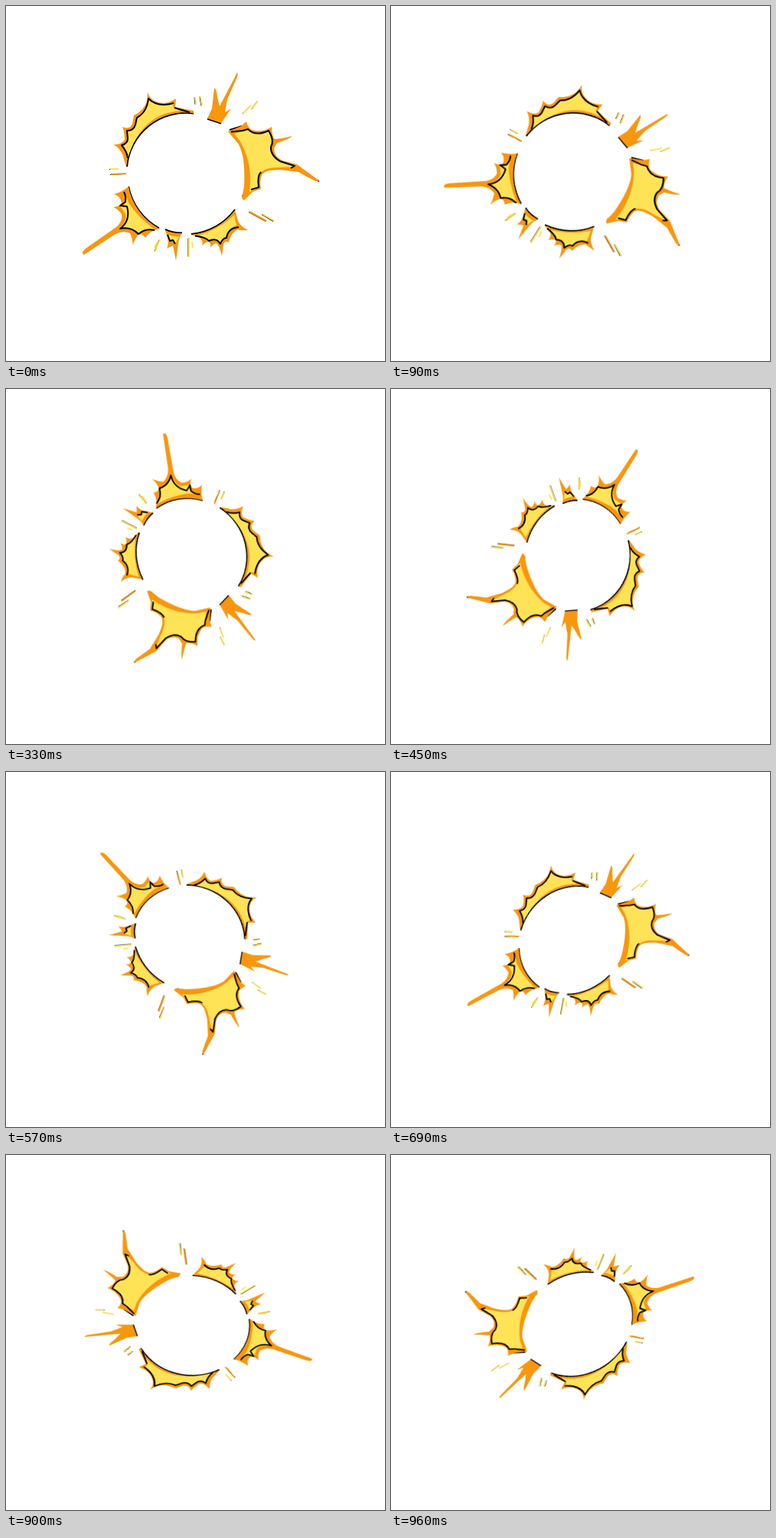
These frames come from a looping animation (495 px wide and 464 px high, 990 ms). An HTML page:

```html
<!DOCTYPE html>
<html lang="en">
<head>
<meta charset="utf-8">
<title>Spinning burst</title>
<style>
  html, body { margin: 0; width: 100%; height: 100%; overflow: hidden; background: #fff; }
  svg { display: block; width: 495px; height: 464px; }

  .o { fill: #f8960e; }
  .y { fill: #fee356; }
  .k { fill: none; stroke: #000; stroke-width: 2; stroke-linejoin: round; }
  .dash { fill: none; stroke-width: 2; }
  .dash.k { stroke-width: 1; transform: translate(-1px, .5px); }
  .dash.a { stroke: #fee356; }
  .dash.b { stroke: #f8960e; }

  /* 33 poses of 30 ms: 15 turning clockwise while shrinking, 18 turning back */
  #burst { animation: spin 990ms infinite; }
  @keyframes spin {
    0% {
      transform: translate(240.5px, 220px) rotate(0deg) matrix(1, 0, 0, 1, 0, 0) translate(-240.5px, -220px);
      animation-timing-function: steps(15, end);
    }
    45.454545% {
      transform: translate(240.5px, 220px) rotate(157.7deg) matrix(.8927, -.0242, -.0358, .9108, .6, 1.4) translate(-240.5px, -220px);
      animation-timing-function: steps(18, end);
    }
    100% {
      transform: translate(240.5px, 220px) rotate(-182deg) matrix(.8851, -.0624, -.0822, .9002, 1, .4) translate(-240.5px, -220px);
    }
  }
</style>
</head>
<body>
<svg viewBox="0 0 495 464" aria-hidden="true">
  <g id="burst">
    <!-- long crescent -->
    <path class="k" d="M158 210A77 77 0 0 1 245 140.500"/>
    <path class="o" d="M157 210L154 200Q153 190 141 181Q151 181 155 175Q155 165 152 158Q162 162 165 154L167 143Q180 137 184 124L185 113Q188 121 194 124Q207 131 222 121L221 132L245 137L245 140A77 77 0 0 0 157 210Z"/>
    <path class="y" d="M159 199Q158 190 151 182Q159 180 159 173L158 163Q167 163 169 155L172 146Q184 139 187 122Q198 134 219 127L218 132L228 137Q177 140 159 199Z"/>
    <path class="k" d="M159 199Q158 190 151 182Q159 180 159 173L158 163Q167 163 169 155L171 146Q184 139 186 121Q198 133 219 127M220 133L240 139"/>

    <!-- crown -->
    <path class="k" d="M263 147.500L281 153.500"/>
    <path class="o" d="M263 147L269 134L272 107Q275 108 276 119L279 131L302 87Q304 89 301 95L289 122L286 139L294 134L281 153Z"/>

    <!-- large flare -->
    <path class="k" d="M292 162L308 157M409 229L392 221M311 253L309 247"/>
    <path class="o" d="M290 164L307 157L314 151Q316 159 321 162Q335 166 347 158Q347 170 351 174Q362 173 374 170Q370 174 354 179L350 186Q350 197 361 202L380 207L410 229L404 229L382 217L358 214Q338 214 334 221Q331 229 333 239L322 243L311 254L308 251L311 236Q313 198 304 181Z"/>
    <path class="y" d="M298 167L316 161Q326 171 343 163Q351 176 346 184Q347 199 360 204L377 210L358 211Q334 210 329 224L330 238L318 243Q323 208 306 177Z"/>
    <path class="k" d="M294 164.500L309 163L316 161Q326 171 343 163Q351 176 346 184Q345 195 358 203L377 209L372 212M333 217Q328 222 330 237L320 240"/>

    <!-- short crescent -->
    <path class="k" d="M299 266A80 80 0 0 1 242 298"/>
    <path class="o" d="M242 299A80 80 0 0 0 299 267L303 281Q306 288 316 293Q308 294 303 292Q294 295 291 309Q286 306 284 311L282 327Q279 314 275 310Q271 310 267 316Q268 309 264 308Q260 309 256 313Q258 307 253 303Z"/>
    <path class="y" d="M250 300.500Q280 291 298 273L301 287Q290 290 288 303Q283 303 280 311Q275 302 265 307Q262 303 250 300.500Z"/>
    <path class="k" d="M247 300.500Q261 302 265 307Q275 302 280 311Q283 303 288 303Q290 290 304 289"/>

    <!-- small tooth -->
    <path class="k" d="M208 292Q218 297 230 296.500"/>
    <path class="o" d="M208 293Q218 298 230 297Q226 302 225 311L222 333L218 313L210 317Q213 310 211 303Z"/>
    <path class="y" d="M212 299Q219 302 226 301L221 312L218 307L214 307Z"/>
    <path class="k" d="M211 299L214 307L218 306L221 311"/>

    <!-- flare with the long spike -->
    <path class="k" d="M200 290.500A80 80 0 0 1 160 236"/>
    <path class="o" d="M160 236A80 80 0 0 0 200 291Q188 294 182 303Q178 297 173 299Q168 304 166 313Q165 303 162 297Q150 292 137 302L102 325Q97 323 104 317L144 289Q153 281 151 272Q146 265 140 263Q149 262 151 257Q150 249 141 246Q152 243 160 236Z"/>
    <path class="y" d="M155 243L160 257Q171 275 194 292Q182 290 173 298Q163 289 148 291Q159 281 156 271L149 262Q158 262 155 250Z"/>
    <path class="k" d="M154 243Q157 248 156 256L149 261L158 262Q163 281 149 291Q163 288 173 298Q182 290 194 293"/>

    <!-- sparks -->
    <path class="dash k" d="M247 119L248 128M254 118L256 130M329 124L322 134M320 130L310 140M136 213L147 213M137 220L156 219M201 305L195 320M239 303L239 327M318 269L340 281M335 272L350 281"/>
    <path class="dash a" d="M247 119L248 128M254 118L256 130M329 124L322 134M320 130L310 140M136 213L147 213M201 305L195 320M197 309L194 316M239 303L239 328M243 308L244 316M335 272L351 281"/>
    <path class="dash b" d="M137 220L157 219M318 269L340 281"/>
  </g>
</svg>
</body>
</html>
```
